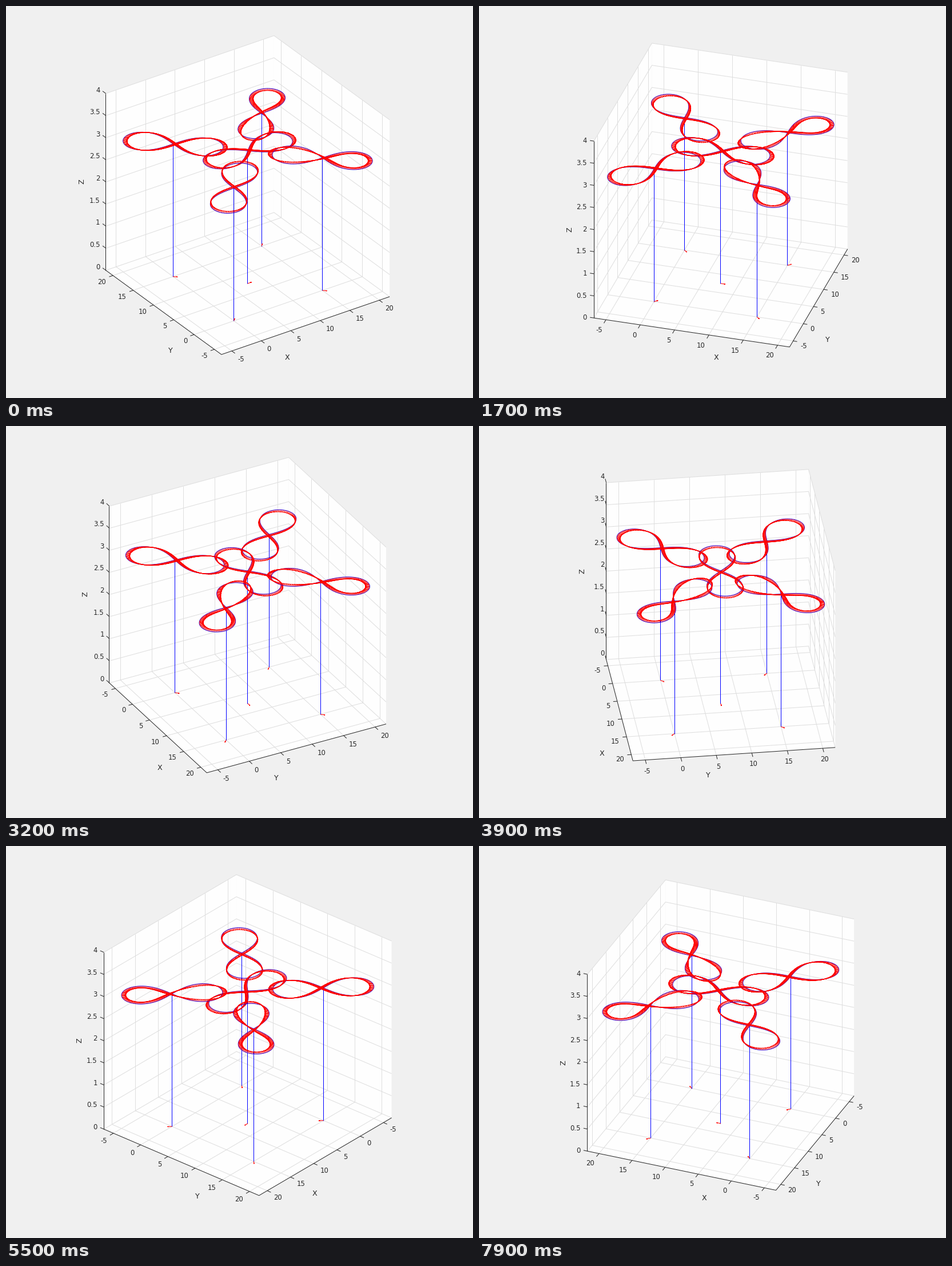
Animation, 817 px wide and 685 px high, one loop 8 s. Source, as a matplotlib script:

```python
import numpy as np
import matplotlib.pyplot as plt
from matplotlib.animation import FuncAnimation
from matplotlib.collections import LineCollection

W, H, DPI = 817, 685, 100
FRAMES, STEP, AZ0 = 80, 3.0, -34.5
CX, CY = 422.9, 484.9          # screen position of the floor's centre
SIDE, SIN_EL = 357.0, 0.5
MID, HALF = 7.5, 14.25         # x and y limits are MID +- HALF
UNIT, ZUNIT = SIDE / (2 * HALF), 77.25
LO, HI = MID - HALF, MID + HALF
XY_TICKS = np.arange(-5, 21, 5)
Z_TICKS = np.arange(0, 4.1, 0.5)
INK, GRID = "#262626", "#dedede"
PX = 72 / DPI

fig = plt.figure(figsize=(W / DPI, H / DPI), dpi=DPI, facecolor="#f0f0f0")
ax = fig.add_axes([0, 0, 1, 1])
ax.set_xlim(0, W)
ax.set_ylim(H, 0)
ax.axis("off")


def project(p, az):
    p = np.asarray(p, float)
    c, s = np.cos(az), np.sin(az)
    x, y = p[..., 0] - MID, p[..., 1] - MID
    up = SIN_EL * (c * y - s * x)
    return np.stack([CX + UNIT * (c * x + s * y),
                     CY - UNIT * up - ZUNIT * p[..., 2]], -1)


def upright(a, b):
    """Vertical line that snaps to the pixel column containing it."""
    x = np.floor(a[0])
    return np.array([[x, a[1]], [x, b[1]]])


def make_flight(x0, y0, axis, spin):
    """Climb path, figure eight and heading arrows of one vehicle."""
    t = np.linspace(-np.pi / 2, 1.5 * np.pi, 201)
    a = np.radians(axis)
    r = 5 * np.sqrt(2) * np.cos(t) / (1 + np.sin(t) ** 2)
    u, v = r, r * np.sin(t)
    eight = np.stack([x0 + u * np.cos(a) - v * np.sin(a),
                      y0 + u * np.sin(a) + v * np.cos(a),
                      np.full_like(t, 3.0)], -1)
    start = np.array([[x0, y0, 0.0]])
    pts = np.vstack([start, eight])
    head = a + spin * np.append(t[0], t)
    d = 0.62 * np.stack([np.cos(head), np.sin(head), 0 * head], -1)
    n = np.stack([-d[:, 1], d[:, 0], 0 * head], -1)
    tip = pts + d
    back = tip - 0.2 * d
    arrows = np.stack([pts, tip, back + 0.1 * n, tip, back - 0.1 * n], 1)
    stem = np.vstack([start, [[x0, y0, 3.0]]])
    return (x0, y0), stem, eight, arrows


flights = [make_flight(*f) for f in (
    (0, 0, 45, 0), (0, 15, -45, 0), (15, 0, 135, -2),
    (15, 15, 225, -2), (7.5, 7.5, 0, 0))]


def lines(color, z):
    col = LineCollection([], colors=color, linewidths=PX, zorder=z)
    col.set_capstyle("butt")
    ax.add_collection(col, autolim=False)
    return col


def blue_line():
    return ax.plot([], [], color="#0000ff", lw=PX, solid_capstyle="butt",
                   scalex=False, scaley=False)[0]


walls = [ax.fill([0, 0, 0, 0], [0, 0, 0, 0], color="#fefefe", lw=0, zorder=0)[0]
         for _ in range(3)]
grid = lines(GRID, 1)
frame_lines = lines(INK, 2)
stems = [blue_line() for _ in flights]
eights = [blue_line() for _ in flights]
quivers = [lines("#ff0000", 5) for _ in flights]


def label(s, size, **kw):
    return ax.text(0, 0, s, fontsize=size * PX, family="DejaVu Sans",
                   color=INK, zorder=3, **kw)


x_nums = [label(str(v), 11.6, va="top") for v in XY_TICKS]
y_nums = [label(str(v), 11.6, va="top") for v in XY_TICKS]
z_nums = [label(f"{v:g}", 11.6, ha="right", va="center_baseline") for v in Z_TICKS]
x_name, y_name = (label(s, 12.8, ha="center", va="center") for s in "XY")
z_name = label("Z", 12.8, ha="center", va="center", rotation=90)


def unit(v):
    return v / np.hypot(*v)


def put_ticks(points, d, nums):
    """Place the numbers beside an edge and return the tick marks."""
    ha = "center" if abs(d[0]) < 0.4 else "left" if d[0] > 0 else "right"
    for p, num in zip(points, nums):
        num.set_position(p + 12.5 * d + (0, 1))
        num.set_ha(ha)
    return [[p, p + 7 * d] for p in points]


def put_name(name, front, far):
    """Axis name: below the edge, shifted towards the front corner."""
    along = unit(front - far)
    perp = np.array([-along[1], along[0]])
    if perp[1] < 0:
        perp = -perp
    v = abs(along[1])
    gap = 31.5 + 42 * v - 24 * v ** 2
    shift = 48.5 + 22 * v ** 8
    name.set_position((front + far) / 2 + shift * along + gap * perp)


def update(i):
    az = np.radians(AZ0 + STEP * i)
    c, s = np.cos(az), np.sin(az)
    P = lambda x, y, z=0: project([x, y, z], az)
    xf, xb = (LO, HI) if s < 0 else (HI, LO)
    yf, yb = (LO, HI) if c > 0 else (HI, LO)

    faces = [[(LO, LO, 0), (HI, LO, 0), (HI, HI, 0), (LO, HI, 0)],
             [(xb, LO, 0), (xb, HI, 0), (xb, HI, 4), (xb, LO, 4)],
             [(LO, yb, 0), (HI, yb, 0), (HI, yb, 4), (LO, yb, 4)]]
    for wall, face in zip(walls, faces):
        wall.set_xy(project(face, az))

    g = []
    for v in XY_TICKS:
        g.append([P(v, yf), P(v, yb)])
        g.append([P(xf, v), P(xb, v)])
        g.append(upright(P(v, yb), P(v, yb, 4)))
        g.append(upright(P(xb, v), P(xb, v, 4)))
    for z in Z_TICKS:
        g.append([P(xf, yb, z), P(xb, yb, z), P(xb, yf, z)])
    grid.set_segments(g)

    front, x_end, y_end = P(xf, yf), P(xb, yf), P(xf, yb)
    x_out, y_out = unit(front - y_end), unit(front - x_end)
    left = (xb, yf) if x_end[0] < y_end[0] else (xf, yb)
    z_out = unit(P(*left) - front)
    marks = put_ticks([P(v, yf) for v in XY_TICKS], x_out, x_nums)
    marks += put_ticks([P(xf, v) for v in XY_TICKS], y_out, y_nums)
    for z, num in zip(Z_TICKS, z_nums):
        p = P(*left, z)
        num.set_position(p + 12.5 * z_out)
        marks.append([p, p + 7 * z_out])
    edges = [[x_end, front, y_end], upright(P(*left), P(*left, 4))]
    frame_lines.set_segments(edges + marks)

    put_name(x_name, front, x_end)
    put_name(y_name, front, y_end)
    z_name.set_position(P(*left, 2) + (-42, -0.5))

    for (pos, stem, eight, arrows), st, ei, qu in zip(flights, stems, eights, quivers):
        depth = c * (pos[1] - MID) - s * (pos[0] - MID)
        st.set_data(*upright(*project(stem, az)).T)
        ei.set_data(*project(eight, az).T)
        qu.set_segments(project(arrows, az))
        for k, art in enumerate((st, ei, qu)):
            art.set_zorder(50 - depth + 0.01 * k)
    return []


anim = FuncAnimation(fig, update, frames=FRAMES, init_func=lambda: update(0),
                     interval=100, repeat=True, repeat_delay=0, blit=False)
plt.show()
```
